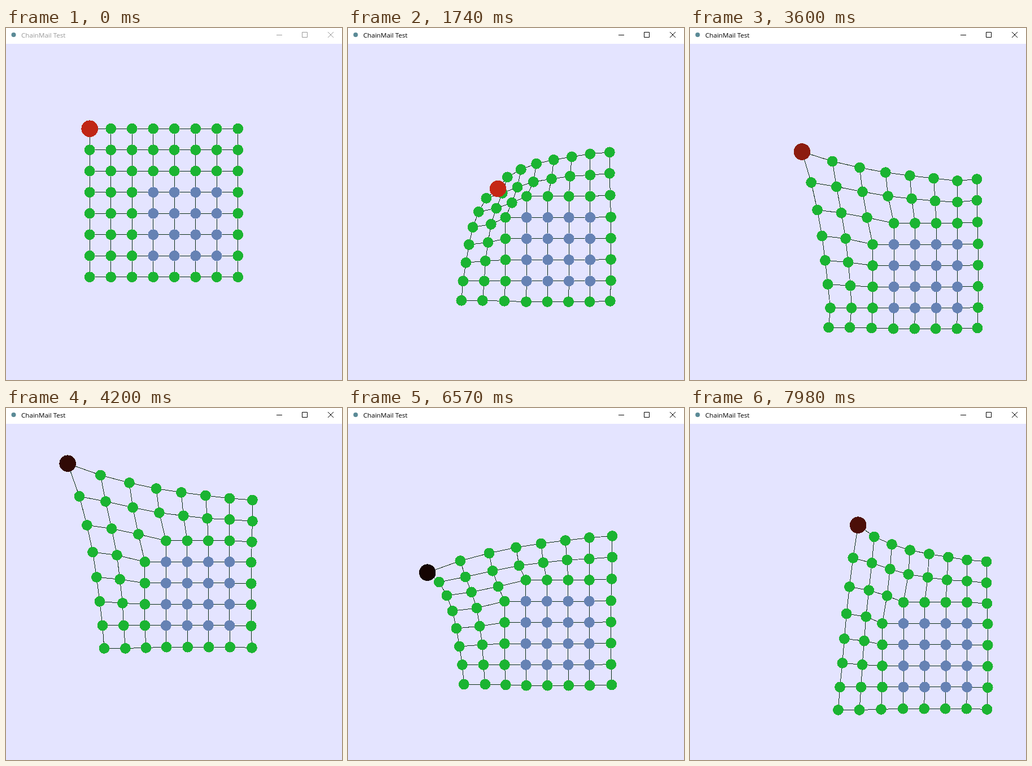
These frames come from a looping animation (595x623 px, 8 s). An HTML page:

```html
<!DOCTYPE html>
<html lang="en">
<head>
<meta charset="utf-8">
<title>ChainMail Test</title>
<style>
  html, body { margin: 0; width: 100%; height: 100%; overflow: hidden; background: #e4e4ff; }
  svg { display: block; width: 595px; height: 623px; }
  #bar { color: #999; }
  #bar.active { color: #000; }
  #bar text { font: 11.6px "Open Sans", "Noto Sans", sans-serif; fill: currentColor; }
  #buttons { fill: none; stroke: currentColor; }
  #mesh { shape-rendering: crispEdges; }
  #links { stroke: #0a2c14; fill: none; }
</style>
</head>
<body>
<svg viewBox="0 0 595 623">
  <rect width="595" height="623" fill="#e4e4ff"/>
  <g id="bar">
    <rect width="595" height="28" fill="#fff"/>
    <circle cx="13.5" cy="12" r="4" fill="#5a8a96"/>
    <text x="27" y="16.8">ChainMail Test</text>
    <g id="buttons">
      <path d="M479 12.5h10M524.5 7.5h9v9h-9z"/>
      <path d="M570 7l10 10M580 7l-10 10"/>
    </g>
  </g>
  <g id="mesh"><path id="links"/></g>
</svg>
<script>
const DURATION = 8000, STEP = 30;
const SIZE = 8, GAP = 37.5, HOME = [148.2, 178.2];

// Largest offset from the rigid block, by grid position (symmetric).
const REACH = [
  [61.7, 41, 27.5, 17.3, 10.5, 5],
  [41, 32, 21.3, 12, 6.7, 2],
  [27.5, 21.3, 11.5]
];
const LIMIT = REACH[0][0];
// How far the last row and column trail behind the block.
const TRAIL = [3, 3, 2, .8, .8, .8, .8, 2];
const SLACK = 3;

// Drag path: time, x, y
const PATH = [
  [0, 148, 178], [420, 148, 178], [840, 176, 203], [1170, 210, 234],
  [1650, 257, 276], [2340, 310, 332], [2550, 310, 332], [3270, 245, 271],
  [4080, 123, 122], [4200, 109, 98], [4410, 104, 79], [4560, 106, 78],
  [4920, 151, 78], [5460, 252, 87], [5700, 308, 79], [5760, 305, 81],
  [6540, 149, 284], [6570, 140.5, 291], [6900, 93, 354], [7050, 91, 361],
  [7380, 159, 345], [7770, 327, 258], [7980, 297.5, 207]
];
// Brightness of the dragged node: time, red
const GLOW = [
  [0, 192], [1170, 200], [2400, 190], [3270, 180], [4080, 56], [4200, 48],
  [5460, 80], [6570, 20], [7980, 76]
];

const clamp = (v, lo, hi) => Math.max(lo, Math.min(hi, v));
const secant = (keys, i, k) =>
  keys[i + 1] && keys[i] ? (keys[i + 1][k] - keys[i][k]) / (keys[i + 1][0] - keys[i][0]) : 0;

function slope(keys, i, k) {
  const a = secant(keys, i - 1, k), b = secant(keys, i, k);
  return a * b > 0 ? 2 * a * b / (a + b) : 0;
}

// Monotone cubic interpolation, never overshooting a key.
function sample(keys, t, k) {
  let i = 0;
  while (i < keys.length - 2 && keys[i + 1][0] <= t) i++;
  const [p, q] = [keys[i], keys[i + 1]];
  const span = q[0] - p[0], s = clamp((t - p[0]) / span, 0, 1);
  const ease = s * s * (3 - 2 * s);
  return p[k] + (q[k] - p[k]) * ease
    + span * s * (1 - s) * ((1 - s) * slope(keys, i, k) - s * slope(keys, i + 1, k));
}

// One axis: the block is dragged along once the mesh is taut.
function axisState(t, axis) {
  const stops = PATH.filter(key => key[0] < t).map(key => key[axis + 1]);
  stops.push(sample(PATH, t, axis + 1));
  let block = 0, tail = 0, pull = 0, fresh = true;
  for (const stop of stops) {
    pull = stop - PATH[0][axis + 1];
    if (Math.abs(pull - block) >= LIMIT) fresh = false;
    block = clamp(block, pull - LIMIT, pull + LIMIT);
    tail = clamp(tail, block - SLACK, block + SLACK);
  }
  const offset = pull - block, tension = Math.abs(offset) / LIMIT;
  const falloff = fresh ? 1 + 8 * (1 - tension) ** 2 : Math.min(1, .5 + .57 * tension);
  return { block, offset, falloff, lag: (tail - block) / SLACK };
}

function place(state, axis, row, col) {
  const near = Math.min(row, col), far = Math.max(row, col);
  const rest = HOME[axis] + GAP * (axis ? row : col) + state.block;
  if (far === SIZE - 1) return rest + TRAIL[near] * state.lag;
  const reach = REACH[near]?.[far] ?? 0;
  return rest + (reach ? state.offset * (reach / LIMIT) ** state.falloff : 0);
}

const mesh = document.getElementById("mesh");
const links = document.getElementById("links");
const bar = document.getElementById("bar");
const nodes = [];
const inBlock = i => i > 2 && i < 7;

for (let row = 0; row < SIZE; row++) {
  for (let col = 0; col < SIZE; col++) {
    const dot = document.createElementNS(mesh.namespaceURI, "circle");
    dot.setAttribute("r", row + col ? 9.4 : 14.8);
    dot.setAttribute("fill", inBlock(row) && inBlock(col) ? "#6682b4" : "#1bb432");
    mesh.append(dot);
    nodes.push({ row, col, dot });
  }
}
const handle = nodes[0].dot;
mesh.append(handle);

function draw(t) {
  const axes = [axisState(t, 0), axisState(t, 1)];
  for (const node of nodes) {
    [node.x, node.y] = axes.map((state, axis) => place(state, axis, node.row, node.col));
    node.dot.setAttribute("cx", node.x);
    node.dot.setAttribute("cy", node.y);
  }
  const link = (a, b) => `M${a.x} ${a.y}L${b.x} ${b.y}`;
  links.setAttribute("d", nodes.map((node, i) =>
    (node.col < SIZE - 1 ? link(node, nodes[i + 1]) : "") +
    (node.row < SIZE - 1 ? link(node, nodes[i + SIZE]) : "")).join(""));
  const red = sample(GLOW, t, 1);
  handle.setAttribute("fill", `rgb(${red}, ${red * .2}, ${red * .11})`);
  bar.classList.toggle("active", t >= 60);
}

const start = performance.now();
function tick() {
  const t = (performance.now() - start) % DURATION;
  draw(t - t % STEP);
  requestAnimationFrame(tick);
}
tick();
</script>
</body>
</html>
```
